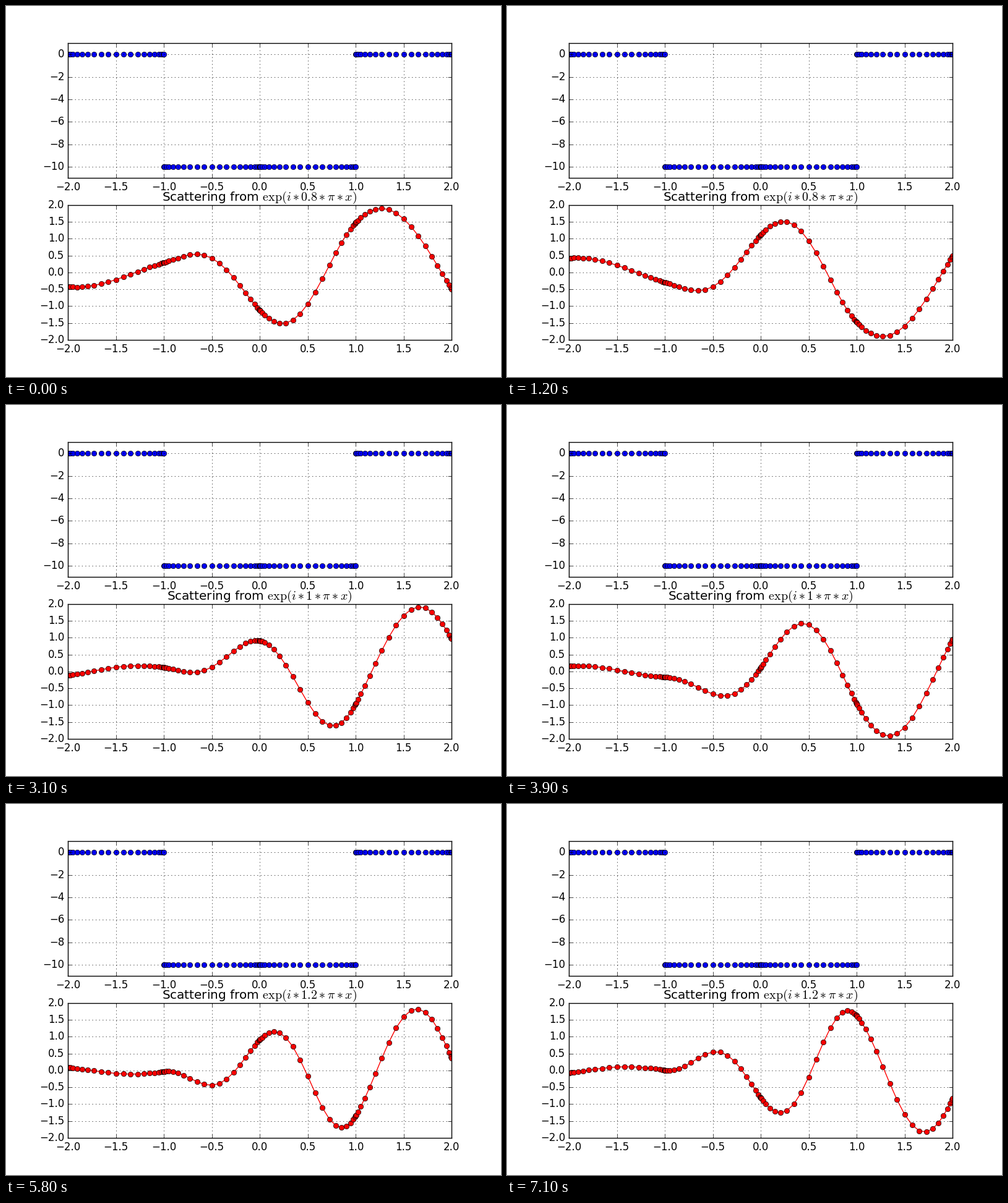
These frames come from a looping animation (800 by 600 pixels, 7.2 s). A matplotlib script:

```python
import numpy as np
import matplotlib.pyplot as plt
from matplotlib.animation import FuncAnimation

plt.style.use("classic")
plt.rcParams["font.sans-serif"] = ["DejaVu Sans"]

DEPTH = 10.0             # square well on [-1, 1]
WAVES = (0.8, 1.0, 1.2)  # wave numbers, in units of pi
STEPS = 24               # frames per period
ORDER = 20               # nodes per element: ORDER + 1

# Chebyshev nodes on four unit elements
nodes = (1 - np.cos(np.pi * np.arange(ORDER + 1) / ORDER)) / 2
x = np.concatenate([start + nodes for start in (-2, -1, 0, 1)])
well = np.repeat([0, -DEPTH, -DEPTH, 0], ORDER + 1)


def scattered(k):
    """Scattered part of the field for an incoming wave exp(ikx)."""
    q = np.sqrt(k * k + DEPTH)
    mix = (k * k + q * q) / (2 * k * q)
    trans = np.exp(-2j * k) / (np.cos(2 * q) - 1j * mix * np.sin(2 * q))

    def inside(s):
        d = q * (s - 1)
        return trans * np.exp(1j * k) * (np.cos(d) + 1j * k / q * np.sin(d))

    refl = (inside(-1) - np.exp(-1j * k)) * np.exp(-1j * k)
    incoming = np.exp(1j * k * x)
    return np.where(x < -1, refl * np.exp(-1j * k * x),
                    np.where(x > 1, (trans - 1) * incoming,
                             inside(x) - incoming))


fields = [scattered(w * np.pi) for w in WAVES]

fig, (top, low) = plt.subplots(2, 1, figsize=(8, 6), dpi=100,
                               facecolor="white")
for ax in (top, low):
    ax.set_xlim(-2, 2)
    ax.set_xticks(np.arange(-2, 2.1, 0.5))
    ax.grid(True)

top.set_ylim(-11, 1)
top.set_yticks(range(-10, 1, 2))
top.plot(x, well, "bo")

low.set_ylim(-2, 2)
low.set_yticks(np.arange(-2, 2.1, 0.5))
curve, = low.plot(x, fields[0].real, "ro-")
title = low.set_title("")


def draw(frame):
    part, step = divmod(frame, STEPS)
    phase = np.exp(-2j * np.pi * step / STEPS)
    curve.set_ydata((fields[part] * phase).real)
    title.set_text(r"Scattering from $\exp(i*%g*\pi*x)$" % WAVES[part])
    return curve, title


anim = FuncAnimation(fig, draw, frames=STEPS * len(WAVES), interval=100,
                     repeat=True, repeat_delay=0, blit=False)
plt.show()
```
